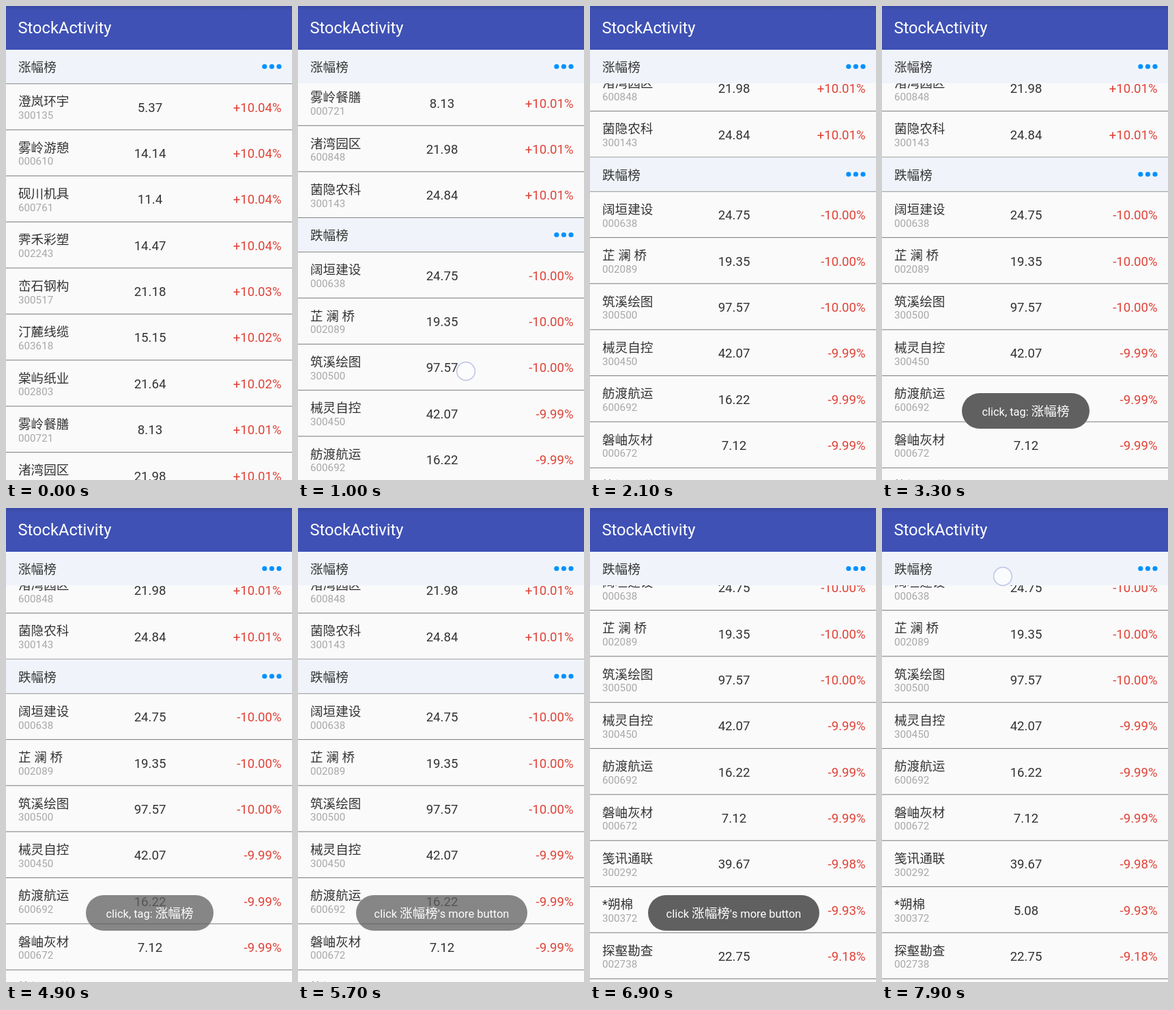
Recreate the animation shown at these times as an HTML page. Size 419 by 693 pixels, loop 8 s.

```html
<!DOCTYPE html>
<html lang="zh-CN">
<head>
<meta charset="utf-8">
<style>
html, body { margin: 0; width: 100%; height: 100%; overflow: hidden; background: #fafafa; }
svg { display: block; }
text { font: 18.6px Roboto, 'Noto Sans CJK SC', 'Noto Sans CJK', sans-serif; fill: #333; }
.title { font-size: 23.7px; fill: #fff; }
.code { font-size: 15.2px; fill: #a8a8a8; }
.price { text-anchor: middle; }
.change { text-anchor: end; fill: #e04338; }
.toast text { fill: #fff; text-anchor: middle; }
.toast .latin { font-size: 16.4px; }
.line { fill: #858585; }
</style>
</head>
<body>
<svg width="419" height="693" viewBox="0 0 419 693">
  <defs>
    <linearGradient id="barShade" x1="0" y1="0" x2="0" y2="1">
      <stop offset="0" stop-color="#3949a4"/>
      <stop offset=".1" stop-color="#3f51b5"/>
    </linearGradient>
  </defs>
  <rect width="419" height="693" fill="#fafafa"/>
  <g id="list"></g>
  <g id="headers"></g>
  <rect width="419" height="64" fill="url(#barShade)"/>
  <text class="title" x="17.5" y="40">StockActivity</text>
  <g id="toasts"></g>
  <circle id="touch" r="13.3" fill="#fcfcfd" fill-opacity=".85" stroke="#c3c9e9" stroke-width="1.7"/>
</svg>
<script>
const BAR = 64, HEADER = 49.1, ROW = 67.35, LOOP = 8000, STEP = 100;

const sections = [
  { title: '涨幅榜', rows: [
    ['澄岚环宇', '300135', '5.37', '+10.04%'],
    ['雾岭游憩', '000610', '14.14', '+10.04%'],
    ['砚川机具', '600761', '11.4', '+10.04%'],
    ['霁禾彩塑', '002243', '14.47', '+10.04%'],
    ['峦石钢构', '300517', '21.18', '+10.03%'],
    ['汀麓线缆', '603618', '15.15', '+10.02%'],
    ['棠屿纸业', '002803', '21.64', '+10.02%'],
    ['雾岭餐膳', '000721', '8.13', '+10.01%'],
    ['渚湾园区', '600848', '21.98', '+10.01%'],
    ['菌隐农科', '300143', '24.84', '+10.01%'] ] },
  { title: '跌幅榜', rows: [
    ['阔垣建设', '000638', '24.75', '-10.00%'],
    ['芷 澜 桥', '002089', '19.35', '-10.00%'],
    ['筑溪绘图', '300500', '97.57', '-10.00%'],
    ['械灵自控', '300450', '42.07', '-9.99%'],
    ['舫渡航运', '600692', '16.22', '-9.99%'],
    ['磐岫灰材', '000672', '7.12', '-9.99%'],
    ['笺讯通联', '300292', '39.67', '-9.98%'],
    ['*朔棉', '300372', '5.08', '-9.93%'],
    ['探壑勘查', '002738', '22.75', '-9.18%'] ] },
];

// Eased scroll movements that add up
const scrolls = [
  { start: 300, duration: 700, by: 477.6 },
  { start: 1000, duration: 450, by: 261 },
  { start: 1500, duration: 500, by: -172.5 },
  { start: 6100, duration: 430, by: 189 },
];

// A finger lands at x, y and then follows the list; lean is its sideways drift
const touches = [
  { start: 400, end: 800, x: 250, y: 500, lean: .04 },
  { start: 1000, end: 2100, x: 246, y: 534, lean: .2 },
  { start: 2600, end: 2800, x: 172.5, y: 102, lean: 0 },
  { start: 5200, end: 5400, x: 394.5, y: 97.5, lean: 0 },
  { start: 6200, end: 6900, x: 270, y: 381.5, lean: .03 },
  { start: 7800, end: 8200, x: 177, y: 100, lean: 0 },
];

const toasts = [
  { start: 2900, end: 4800, x: 117, width: 187, before: 'click, tag: ', after: '' },
  { start: 5400, end: 7300, x: 85, width: 251, before: 'click ', after: "'s more button" },
];

const byId = id => document.getElementById(id);
const clamp01 = v => Math.max(0, Math.min(1, v));
const ease = k => (1 - Math.cos(Math.PI * clamp01(k))) / 2;
const line = y => `<rect class="line" y="${y}" width="419" height="1.1"/>`;
const move = (el, y) => el.setAttribute('transform', `translate(0 ${y})`);

function rowMarkup([name, code, price, change], y) {
  return `<text x="18" y="${y + 33.3}">${name}</text>
    <text class="code" x="18" y="${y + 52}">${code}</text>
    <text class="price" x="211" y="${y + 41.6}">${price}</text>
    <text class="change" x="403.6" y="${y + 41.6}">${change}</text>` + line(y + ROW);
}

let bottom = BAR;
let listMarkup = '';
for (const section of sections) {
  section.top = bottom;
  const first = bottom + HEADER;
  listMarkup += line(first) + section.rows.map((row, i) => rowMarkup(row, first + i * ROW)).join('');
  bottom = first + section.rows.length * ROW + 1;
}
byId('list').innerHTML = listMarkup;

byId('headers').innerHTML = sections.map(({ title }) =>
  `<g><rect width="419" height="${HEADER}" fill="#f0f4fa"/>
    <text x="18" y="32.3">${title}</text>
    ${[0, 1, 2].map(i => `<circle cx="${378.8 + i * 10.6}" cy="24.5" r="3.6" fill="#0091ff"/>`).join('')}</g>`).join('');

byId('toasts').innerHTML = toasts.map(({ x, width, before, after }) =>
  `<g class="toast"><rect x="${x}" y="566" width="${width}" height="52" rx="26" fill="#606060"/>
    <text x="${x + width / 2}" y="598.5" xml:space="preserve"><tspan class="latin">${before}</tspan>涨幅榜<tspan class="latin">${after}</tspan></text></g>`).join('');

const [headerA, headerB] = byId('headers').children;
const toastNodes = byId('toasts').children;
const touchNode = byId('touch');

const scrollAt = t =>
  scrolls.reduce((sum, { start, duration, by }) => sum + by * ease((t - start) / duration), 0);

function render(t) {
  const scroll = scrollAt(t);
  move(byId('list'), -scroll);

  // The second header sticks below the bar and pushes the first one out
  const topB = Math.max(BAR, sections[1].top - scroll);
  move(headerB, topB);
  move(headerA, Math.min(BAR, topB - HEADER));

  toasts.forEach(({ start, end }, i) => {
    const opacity = Math.min(clamp01((t - start) / 400), 1 - clamp01((t - end) / 400));
    toastNodes[i].setAttribute('opacity', opacity);
  });

  const touch = touches.find(({ start, end }) => t >= start && t < end);
  touchNode.setAttribute('opacity', touch ? clamp01((touch.end - t) / 200) : 0);
  if (touch) {
    const dragged = scroll - scrollAt(touch.start);
    touchNode.setAttribute('cx', touch.x + touch.lean * dragged);
    touchNode.setAttribute('cy', touch.y - dragged);
  }
}

const startTime = performance.now();
function tick() {
  const t = (performance.now() - startTime) % LOOP;
  render(Math.floor(t / STEP) * STEP);
  requestAnimationFrame(tick);
}
tick();
</script>
</body>
</html>
```
